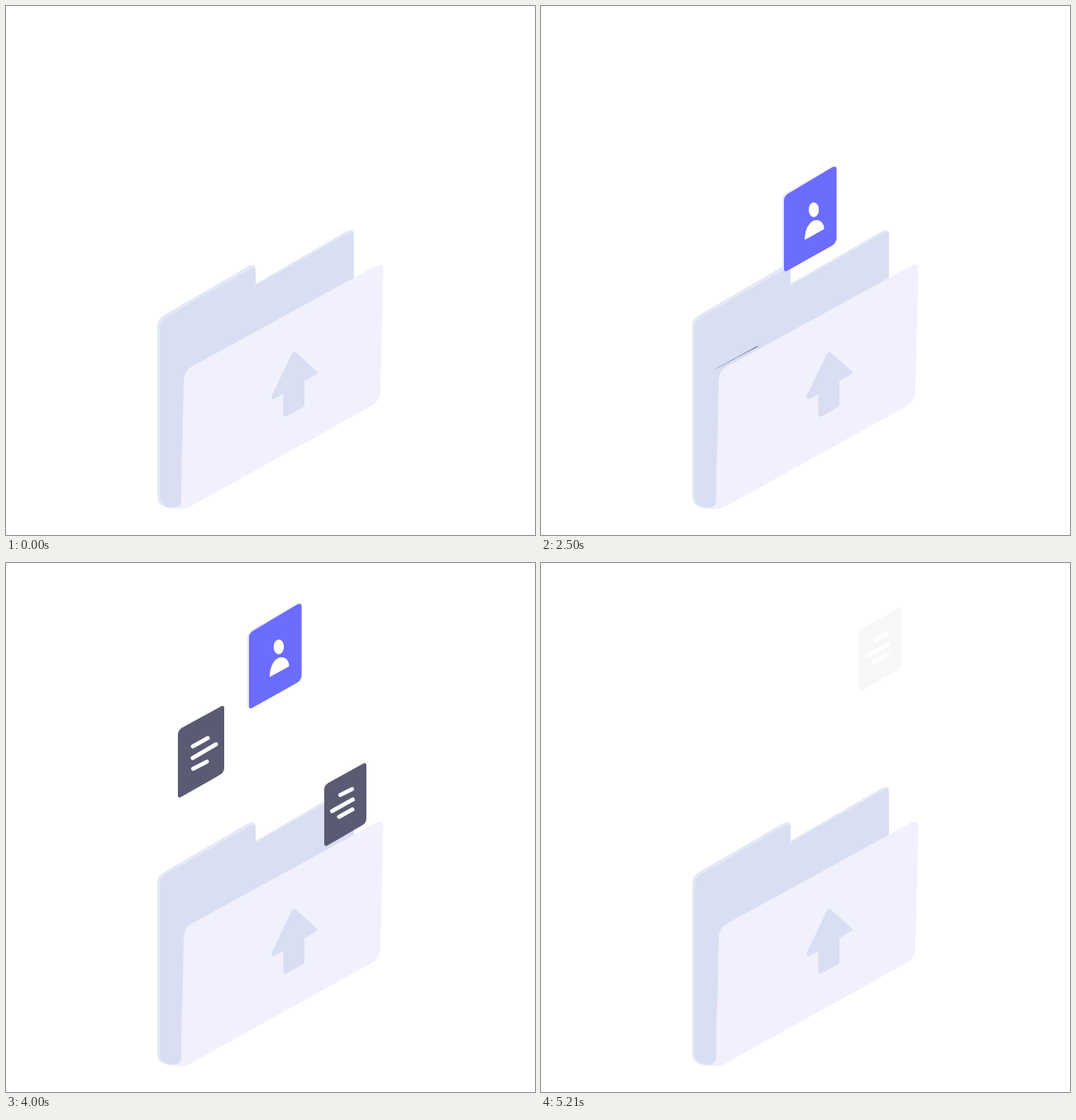
An HTML page that plays this animation: 640 px wide and 640 px high, repeating every 5.57 s.

```html
<!DOCTYPE html>
<html lang="en">
<head>
<meta charset="utf-8">
<title>Folder upload</title>
<style>
  html, body { margin: 0; width: 100%; height: 100%; overflow: hidden; background: #fff; }
  svg { display: block; width: 100%; height: 100%; }
  .rim { fill: #e5e8f6; }
  .shade { fill: #d9def2; }
  .front { fill: #f0f1fc; }
  .blue { fill: #6c6cff; }
  .slate { fill: #5a5b73; }
  .white { fill: #fff; }
  .lines { fill: none; stroke: #fff; stroke-width: 5; stroke-linecap: round; }
</style>
</head>
<body>
<svg viewBox="0 0 640 640">
  <clipPath id="opening"><path d="M0 0H640V209.900L208 441L0 552.300Z"/></clipPath>

  <path class="rim" d="M183 387Q183 379 191 374L294 314.300Q302 311 302 319V336L413 272Q421 268.500 421 276V480L220 606Q213 610 203 608Q183 607 183 594Z"/>
  <path class="shade" d="M186 389Q186 381 194 376.500L296 317.800Q301 315.500 302 318V338.300L415 274.600Q420 272.500 421 275V480L212 540V600Q211 607 201 607Q186 605 186 594Z"/>

  <g clip-path="url(#opening)">
    <g id="profile">
      <path class="rim" d="M292 41Q292 35 297 31.500L350 1L356 0L300 60L296 126Q292 127 292 123Z"/>
      <path class="blue" d="M294 41Q294 35.500 299 32.500L353 .3Q357.600 -1.500 357.600 3V86Q357.600 92 352 95.500L297.500 126Q294 127.500 294 123.500Z"/>
      <ellipse class="white" cx="330" cy="52" rx="6.200" ry="9"/>
      <path class="white" d="M319 88.500C319 75 325 65 333 64.500C339 64.500 342.500 69 342.500 75.500Z"/>
    </g>
    <g id="noteLeft">
      <path class="slate" d="M208 35Q208 29.500 213 26.500L260.500 .3Q264 -1 264 2.500V75Q264 80 259.500 83L211.500 110.500Q208 112 208 108Z"/>
      <path class="lines" d="M226 49L244 39M226 63L254 46.500M226.500 76L243 67.500"/>
    </g>
    <g id="noteRight">
      <path class="slate" d="M385 32Q385 27 390 24L432.500 .3Q436 -1 436 2.500V67Q436 72 431.500 75L388.500 99.800Q385 101 385 98Z"/>
      <path class="lines" d="M404.500 38.500L418.500 31.500M394.500 58L419.500 44M403 65L419 56"/>
    </g>
  </g>

  <path class="front" d="M215 453Q215.500 441 225 436L448 314Q456.500 310.500 456.500 319L453 466Q452.500 478 443 483.500L222 606Q217 609 210 608.700L200 607.500Q211 607 212 600Z"/>
  <path class="shade" d="M346 420.500Q348 417 351 419.500L376 442Q378 444 375.500 445.500L361 453.800V482Q361 484.500 359 485.600L339.500 496.500Q335.500 498 335.500 494V469.500L325.500 475Q320 477 321.500 471.500Z"/>
</svg>
<script>
  const FPS = 14, LOOP = 5570, LAST = 73;
  const RISE = 70, FADE = 11.3;

  // Each card rises `half` px either side of `mid`; times are in ticks.
  const cards = [
    { id: 'profile', start: 0, mid: 194.5, half: 179.3, fade: 57.6 },
    { id: 'noteLeft', start: 10, mid: 297.5, half: 263, fade: 60 },
    { id: 'noteRight', start: 10.5, mid: 416, half: 383, fade: 63.1 }
  ].map(card => ({ ...card, el: document.getElementById(card.id) }));

  // Half a cosine wave, from 1 to -1.
  const swing = p => Math.cos(Math.PI * Math.min(1, Math.max(0, p)));

  function draw(ms) {
    const tick = Math.min(LAST, Math.floor(ms * FPS / 1000 + 0.07));
    for (const { el, start, mid, half, fade } of cards) {
      const y = mid + half * swing((tick - start) / RISE);
      el.setAttribute('transform', `translate(0 ${y.toFixed(2)})`);
      el.setAttribute('opacity', tick < 10 ? 0 : (1 + swing((tick - fade) / FADE)) / 2);
    }
  }

  const begin = performance.now();
  function loop() {
    draw((performance.now() - begin) % LOOP);
    requestAnimationFrame(loop);
  }
  loop();
</script>
</body>
</html>
```
